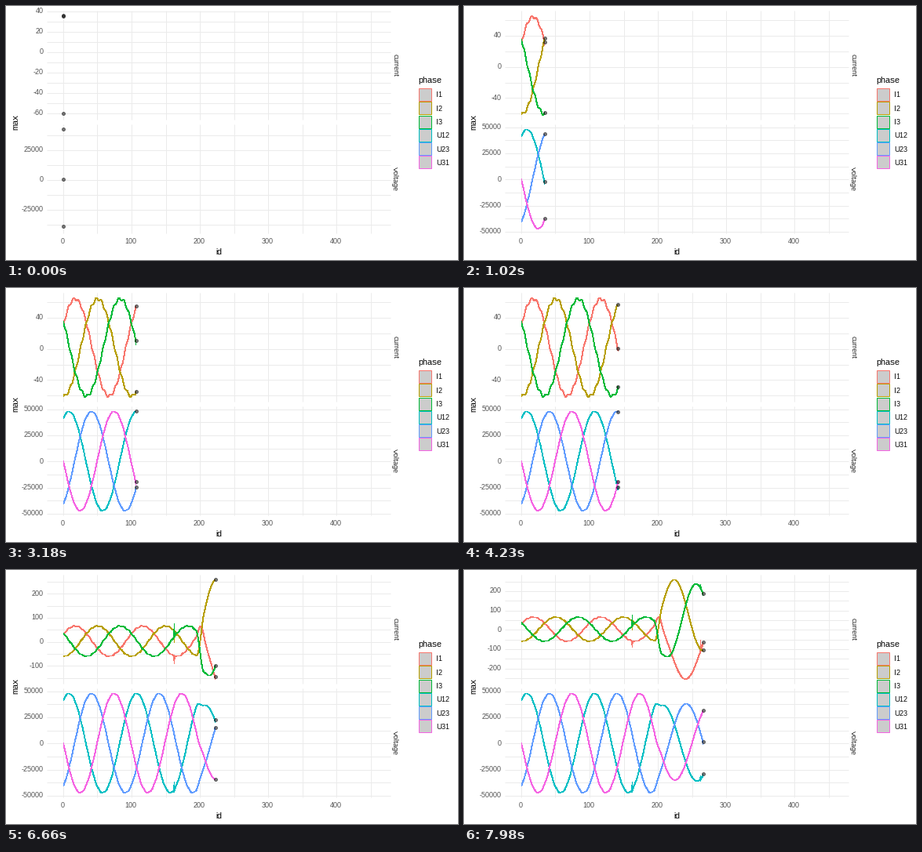
Animation of 576 by 324 pixels, one loop 8 s. Source, as a matplotlib script:

```python
import numpy as np
import matplotlib.pyplot as plt
from matplotlib.animation import FuncAnimation
from matplotlib.collections import LineCollection
from matplotlib.patches import Polygon, Rectangle

W, H = 576, 324
LOOP, INTERVAL, STEP = 8000, 20, 30      # ms; one new sample every STEP
N = 267                                  # samples shown by the end
PERIOD = 99
X0, DX = 72.4, 0.871                     # pixel of id 0, pixels per id
LEFT, RIGHT = 52, 490
PANEL_H = 139.5
TOPS = (6, 151)
PAD = PANEL_H / 1.1 * 0.05
COLORS = ["#F8766D", "#B79F00", "#00BA38", "#00BFC4", "#619CFF", "#F564E3"]
NAMES = ["I1", "I2", "I3", "U12", "U23", "U31"]
GREY = "#4D4D4D"

plt.rcParams["font.family"] = "Liberation Sans"
plt.rcParams["text.hinting"] = "native"
plt.rcParams["text.hinting_factor"] = 1


# ---- data: steady three-phase waves that pass into a disturbed state
def wave(t, peak, period):
    return np.cos(2 * np.pi * (t - peak) / period)


def steady(t, first_peak, amp, ripple, offset):
    """Three waves a third of a period apart, with a small 13th harmonic."""
    peaks = [first_peak + PERIOD / 3 * n for n in range(3)]
    return np.array([offset + amp * (wave(t, p, PERIOD)
                                     + ripple * wave(t, p - 2.2, PERIOD / 13))
                     for p in peaks])


def smoothstep(t, start, end):
    u = np.clip((t - start) / (end - start), 0, 1)
    return u * u * (3 - 2 * u)


def signals(t):
    mix = smoothstep(t, 194, 206)

    # in each disturbed set the third wave balances the other two
    i1 = -121 - 135 * wave(t, 241, 84)
    i2 = 74 + 183 * wave(t, 224.5, 84)
    current = np.array([i1, i2, -i1 - i2])
    u23 = 37700 * wave(t, 242, 100)
    u31 = -35400 * wave(t, 225.5, 100)
    voltage = np.array([-u23 - u31, u23, u31])

    current = (1 - mix) * steady(t, 18, 62.5, 0.032, 1.5) + mix * current
    voltage = (1 - mix) * steady(t, 9, 47400, 0.008, 0) + mix * voltage
    kick = np.exp(-((t - 203) / 5) ** 2)
    current[0] += 48 * kick
    current[2] -= 30 * kick
    return np.concatenate([current, voltage])


ids = np.arange(1, N + 1)
samples = signals(ids[:, None] + np.linspace(-0.5, 0.5, 7))
lo, hi = samples.min(axis=2), samples.max(axis=2)


def spike(name, at, down=0, up=0):
    i = NAMES.index(name)
    lo[i, at - 1] -= down
    hi[i, at - 1] += up


spike("I1", 163, down=31)
spike("I2", 163, down=48)
spike("I3", 163, up=52)
spike("U12", 163, down=1500, up=7000)
spike("I1", 263, up=50)
spike("I3", 263, up=15)
spike("U12", 263, down=1500, up=2500)

# limits of each panel grow with the samples seen so far
groups = (slice(0, 3), slice(3, 6))
mins = [np.minimum.accumulate(lo[g].min(axis=0)) for g in groups]
maxs = [np.maximum.accumulate(hi[g].max(axis=0)) for g in groups]


def break_step(span):
    for limit, step in ((110, 20), (150, 40), (230, 50), (1000, 100)):
        if span < limit:
            return step
    return 25000


# ---- static parts, in pixel coordinates
fig = plt.figure(figsize=(W / 72, H / 72), dpi=72, facecolor="white")
ax = fig.add_axes([0, 0, 1, 1])
ax.set_xlim(0, W)
ax.set_ylim(H, 0)
ax.axis("off")


def label(x, y, s, size=9, color="black", ha="left", rotation=0):
    return ax.text(x, y, s, size=size, color=color, ha=ha, va="baseline",
                   rotation=rotation, rotation_mode="anchor")


def grid(segments):
    lines = LineCollection(segments, colors="#EBEBEB", linewidths=1, zorder=1)
    lines.set_capstyle("butt")
    ax.add_collection(lines, autolim=False)
    return lines


def to_x(v):
    return X0 + DX * v


def crisp(v):
    """Centre of the pixel that holds v."""
    return int(v) + 0.5


grid([[(crisp(to_x(v)), top), (crisp(to_x(v)), int(top + PANEL_H))]
      for top in TOPS for v in range(0, 451, 50)])
for v in range(0, 401, 100):
    label(to_x(v) - 0.5, 303, str(v), color=GREY, ha="center")
label(271, 317, "id", size=11, ha="center")
label(15, 148, "max", size=11, ha="center", rotation=90)
for top, name in zip(TOPS, ("current", "voltage")):
    label(493.4, top + PANEL_H / 2 - 0.5, name, color="#1A1A1A", ha="center", rotation=-90)

label(525, 98, "phase", size=11)
for i, name in enumerate(NAMES):
    y = 104.5 + 17.28 * i
    ax.add_patch(Rectangle((525.5, crisp(y)), 16, 16, facecolor="#CCCCCC",
                           edgecolor=COLORS[i], linewidth=1))
    label(548, round(y + 12), name)

# ---- moving parts
rows = grid([])
ticks = [label(47.7, 0, "", color=GREY, ha="right") for _ in range(18)]
ribbons = [ax.add_patch(Polygon([(0, 0), (0, 0)], facecolor=c, edgecolor="none",
                                linewidth=0, antialiased=False, snap=False, zorder=3))
           for c in COLORS]
dots = ax.scatter(np.zeros(6), np.zeros(6), s=16, facecolors=[(0, 0, 0, 0.5)],
                  edgecolors=[(0, 0, 0, 0.5)], linewidths=1, zorder=4)


def draw(frame):
    k = min((frame * INTERVAL + STEP // 3) // STEP, N - 1)
    xs = to_x(ids[:k + 1])
    segments, marks, points = [], [], []
    for p, top in enumerate(TOPS):
        low, high = mins[p][k], maxs[p][k]
        scale = (PANEL_H - 2 * PAD) / (high - low)

        def to_y(v):
            return top + PAD + (high - v) * scale

        step = break_step(high - low)
        half = step / 2
        first = int(np.ceil((low - PAD / scale) / half))
        last = int(np.floor((high + PAD / scale) / half))
        for n in range(first, last + 1):
            y = to_y(n * half)
            segments.append([(LEFT, crisp(y)), (RIGHT, crisp(y))])
            if n % 2 == 0:
                marks.append((y, str(n // 2 * step)))

        # a sliver of extra height keeps flat stretches visible
        for i in range(3 * p, 3 * p + 3):
            upper = np.column_stack([xs, to_y(hi[i, :k + 1]) - 0.2])
            lower = np.column_stack([xs, to_y(lo[i, :k + 1]) + 0.2])
            ribbons[i].set_xy(np.concatenate([upper, lower[::-1]]))
            points.append(upper[-1])

    rows.set_segments(segments)
    dots.set_offsets(points)
    for n, tick in enumerate(ticks):
        used = n < len(marks)
        tick.set_visible(used)
        if used:
            tick.set_y(marks[n][0] + 2.8)
            tick.set_text(marks[n][1])
    return [rows, dots, *ribbons, *ticks]


anim = FuncAnimation(fig, draw, frames=LOOP // INTERVAL, interval=INTERVAL,
                     init_func=lambda: draw(0), repeat=True, repeat_delay=0, blit=False)
plt.show()
```
